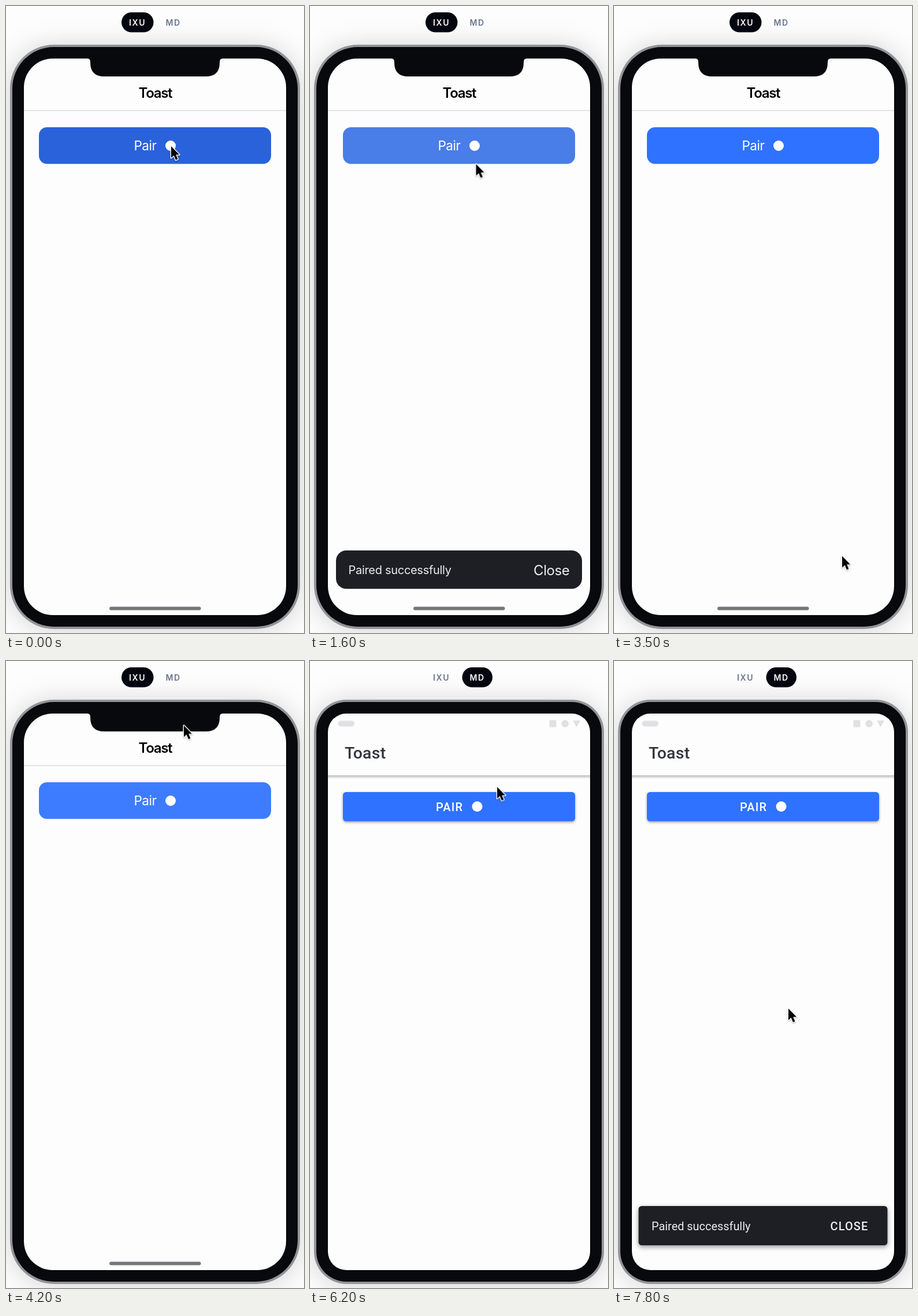
An HTML page that plays this animation: 516 by 1086 pixels, repeating every 8 s.

```html
<!DOCTYPE html>
<html lang="en">
<head>
<meta charset="utf-8">
<title>Toast preview</title>
<style>
  html, body { margin: 0; width: 100%; height: 100%; overflow: hidden; background: #fefdfe; }
  svg { display: block; width: 516px; height: 1086px; }
  text { font-family: Inter, "Open Sans", sans-serif; }
  .roboto text { font-family: Roboto, "Noto Sans", sans-serif; }

  /* One shared 8 s clock: 1.25% = 100 ms */
  .shell, .bezel, .screen, .round, .flat, .pill-round, .pill-flat, .tab-round, .tab-flat,
  .btn-round, .btn-flat, .toast-round, .toast-flat, .ripple, .cursor, .arrow, .hand {
    animation: 8s linear infinite both;
  }

  /* Device */
  .shell { animation-name: shell; filter: drop-shadow(0 2px 22px rgba(0, 0, 0, .17)); }
  .bezel { animation-name: bezel; }
  .screen { animation-name: screen; }
  @keyframes shell  { 0%, 63% { rx: 76px } 67.5%, 100% { rx: 56px } }
  @keyframes bezel  { 0%, 63% { rx: 72px } 67.5%, 100% { rx: 52px } }
  @keyframes screen { 0%, 63% { rx: 50px } 67.5%, 100% { rx: 32px } }

  /* Mode switch */
  .round, .flat { animation-timing-function: step-end; }
  .round { animation-name: first; }
  .flat { animation-name: second; }
  @keyframes first  { 0% { visibility: visible } 63.7%, 100% { visibility: hidden } }
  @keyframes second { 0% { visibility: hidden } 63.7%, 100% { visibility: visible } }

  .tabs text { font-size: 14px; font-weight: 600; letter-spacing: 1.6px; }
  .pill-round { animation-name: pill-out; }
  .pill-flat { animation-name: pill-in; }
  .tab-round { animation-name: tab-out; }
  .tab-flat { animation-name: tab-in; }
  @keyframes pill-out { 0%, 63% { opacity: 1 } 66%, 100% { opacity: 0 } }
  @keyframes pill-in  { 0%, 63% { opacity: 0 } 66%, 100% { opacity: 1 } }
  @keyframes tab-out { 0%, 63% { fill: #fff } 66%, 100% { fill: #65748b } }
  @keyframes tab-in  { 0%, 63% { fill: #65748b } 66%, 100% { fill: #fff } }

  /* Buttons */
  .btn-round { animation-name: btn-round; }
  @keyframes btn-round {
    0%, 8.1% { fill: #2a62db }
    10%, 19.5% { fill: #5080e1 }
    22%, 50.5% { fill: #2f72ff }
    51.5% { fill: #4a85ff }
    52.5% { fill: #3d7cff }
    55%, 100% { fill: #2f72ff }
  }
  .btn-flat { animation-name: btn-flat; }
  @keyframes btn-flat {
    0%, 78% { fill: #2f72ff }
    80%, 94.5% { fill: #417eff }
    97%, 100% { fill: #2f72ff }
  }
  .ripple { animation-name: ripple; }
  @keyframes ripple {
    0%, 84.3% { r: 20px; opacity: 0 }
    84.4% { r: 20px; opacity: .16; animation-timing-function: ease-out }
    88% { r: 290px; opacity: .14 }
    91%, 100% { r: 290px; opacity: 0 }
  }
  .raised { filter: drop-shadow(0 2px 2px rgba(0, 0, 0, .36)); }

  /* Toasts */
  .toast-round { animation-name: slide; }
  @keyframes slide {
    0% { transform: translateY(118px) }
    11% { transform: translateY(118px); animation-timing-function: cubic-bezier(.155, 1.105, .295, 1.12) }
    16% { transform: none }
    40% { transform: none; animation-timing-function: cubic-bezier(.36, .66, .04, 1) }
    43.5%, 100% { transform: translateY(118px) }
  }
  .toast-flat { animation-name: fade; filter: drop-shadow(0 3px 4px rgba(0, 0, 0, .42)); }
  @keyframes fade {
    0% { opacity: 0 }
    84.4% { opacity: 0; animation-timing-function: cubic-bezier(.36, .66, .04, 1) }
    89.4%, 100% { opacity: 1 }
  }

  /* Pointer */
  .cursor { animation-name: move; }
  @keyframes move {
    0%, 7.5% { transform: translate(286px, 243px) }
    8.75%, 18.75% { transform: translate(285px, 247px) }
    21.25% { transform: translate(290px, 300px) }
    23.75% { transform: translate(300px, 420px) }
    26.25% { transform: translate(314px, 565px) }
    27.5%, 28.75% { transform: translate(318px, 597px) }
    30% { transform: translate(373px, 871px) }
    31.25% { transform: translate(390px, 935px) }
    33.75%, 40% { transform: translate(397px, 970px) }
    43.75% { transform: translate(395px, 953px) }
    46.25% { transform: translate(385px, 880px) }
    48.75% { transform: translate(350px, 560px) }
    51.25% { transform: translate(312px, 225px) }
    52.5% { transform: translate(308px, 112px) }
    54.4% { transform: translate(296px, 50px) }
    57.5%, 71.9% { transform: translate(289px, 30px) }
    75% { transform: translate(303px, 90px) }
    77.5% { transform: translate(324px, 218px) }
    79.4% { transform: translate(334px, 243px) }
    81.9%, 93.1% { transform: translate(337px, 251px) }
    95% { transform: translate(315px, 310px) }
    96.25% { transform: translate(308px, 480px) }
    97.5%, 100% { transform: translate(302px, 602px) }
  }
  .arrow, .hand { animation-timing-function: step-end; }
  .arrow { animation-name: arrow; }
  .hand { animation-name: hand; }
  @keyframes arrow {
    0%, 20%, 40.5%, 73%, 94.2% { opacity: 1 }
    8.7%, 32%, 55%, 78.2% { opacity: 0 }
    100% { opacity: 1 }
  }
  @keyframes hand {
    0%, 20%, 40.5%, 73%, 94.2% { opacity: 0 }
    8.7%, 32%, 55%, 78.2% { opacity: 1 }
    100% { opacity: 0 }
  }
  .cursor path { filter: drop-shadow(0 1.5px 1.2px rgba(0, 0, 0, .3)); }
</style>
</head>
<body>
<svg viewBox="0 0 516 1086">
  <defs>
    <clipPath id="glass"><rect x="31" y="91" width="454" height="964" rx="32"/></clipPath>
    <clipPath id="face"><rect x="57" y="227" width="402" height="50.5" rx="5.5"/></clipPath>
    <linearGradient id="bar" x1="0" y1="0" x2="0" y2="1">
      <stop offset="0" stop-color="#000" stop-opacity=".26"/>
      <stop offset="1" stop-color="#000" stop-opacity="0"/>
    </linearGradient>
  </defs>

  <rect class="shell" x="7" y="67" width="502" height="1012" fill="#909497"/>
  <rect class="bezel" x="11" y="71" width="494" height="1004" fill="#07090c"/>
  <rect class="screen" x="31" y="91" width="454" height="964" fill="#fefdfe"/>

  <g class="tabs">
    <rect class="pill-round" x="200" y="11" width="55.5" height="34.5" rx="17.25" fill="#03050f"/>
    <rect class="pill-flat" x="263.5" y="11" width="52.5" height="34.5" rx="17.25" fill="#03050f"/>
    <text class="tab-round" x="213" y="34">IXU</text>
    <text class="tab-flat" x="276.5" y="34">MD</text>
  </g>

  <g class="round">
    <path d="M141 90H375V91Q370 91 370 97V98Q370 122 346 122H170Q146 122 146 98V97Q146 91 141 91Z" fill="#07090c"/>
    <text x="229.5" y="159" font-size="24" font-weight="600" letter-spacing="-1.3">Toast</text>
    <rect x="31" y="180.5" width="454" height="1.2" fill="#d2d2d5"/>
    <rect class="btn-round" x="57" y="210" width="402" height="63.5" rx="14"/>
    <text x="221.5" y="250" font-size="22.5" letter-spacing="-.5" fill="#fff">Pair</text>
    <circle cx="285" cy="242" r="9" fill="#fff"/>
    <g clip-path="url(#glass)">
      <g class="toast-round">
        <rect x="45" y="943" width="426" height="66.5" rx="18" fill="#1e1f24"/>
        <g fill="#ededef">
          <text x="66.5" y="984" font-size="20" letter-spacing="-.3">Paired successfully</text>
          <text x="387" y="985.5" font-size="24" letter-spacing="-.4">Close</text>
        </g>
      </g>
    </g>
    <rect x="179" y="1040.5" width="158.5" height="6" rx="3" fill="#76777a"/>
  </g>

  <g class="flat roboto">
    <g fill="#e1e0e2">
      <rect x="48.5" y="103.5" width="28.5" height="10" rx="5"/>
      <rect x="414.5" y="102.5" width="12" height="12" rx="1"/>
      <circle cx="441.7" cy="108.5" r="6.3"/>
      <path d="M455 103H468L461.5 114.5Z"/>
    </g>
    <text x="60" y="168.5" font-size="28.4" font-weight="500" letter-spacing=".3" fill="#31353b">Toast</text>
    <rect x="31" y="198" width="454" height="6" fill="url(#bar)"/>
    <g class="raised">
      <rect class="btn-flat" x="57" y="227" width="402" height="50.5" rx="5.5"/>
    </g>
    <g clip-path="url(#face)">
      <circle class="ripple" cx="337" cy="251" r="20" fill="#fff"/>
    </g>
    <text x="218" y="259.5" font-size="20" font-weight="500" letter-spacing="1.2" fill="#fff">PAIR</text>
    <circle cx="289.5" cy="252" r="9" fill="#fff"/>
    <g class="toast-flat">
      <rect x="42.5" y="944" width="431" height="68" rx="5.5" fill="#1e1f24"/>
      <g fill="#ededef">
        <text x="65" y="985.5" font-size="19.9">Paired successfully</text>
        <text x="374.5" y="985.5" font-size="20" font-weight="500" letter-spacing="1.1">CLOSE</text>
      </g>
    </g>
  </g>

  <g class="cursor" stroke-linejoin="round">
    <g class="arrow">
      <path d="M0 0V20L4.6 15.8L8 23.8L11.5 22.3L8.2 14.5H14.2Z" fill="#000" stroke="#fff" stroke-width="2.8" paint-order="stroke"/>
    </g>
    <g class="hand">
      <path d="M-2.6 2Q-2.6 -.6 0 -.6Q2 -.6 2.6 2L3.6 7.5Q6 6 7.2 8.2Q9.6 7 10.8 9.3Q13.8 8.8 14 12L13.6 16.5Q13 19 12 20.5V23.5H2.5Q0 19 -3.6 15.2Q-6.2 11.6 -4.2 10.6Q-2.6 10 -.7 12Z"
            fill="#fff" stroke="#000" stroke-width="1.5"/>
      <path d="M4 14.5V19.5M6.8 14.5V19.5M9.6 14.5V19.5" fill="none" stroke="#000" stroke-width="1"/>
    </g>
  </g>
</svg>
</body>
</html>
```
